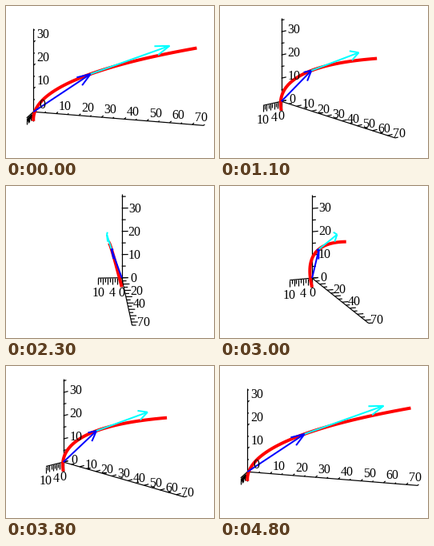
Write a matplotlib script that moves like this. It is 260 by 190 pixels and loops after 4.9 s.

```python
import numpy as np
import matplotlib.pyplot as plt
from matplotlib.animation import FuncAnimation
from matplotlib.collections import LineCollection

W, H, DPI = 260, 190, 100
FRAMES, HALF = 49, 24
FIRST, LAST = 16.7, 89.7                  # turn of the box in degrees
SCALE, SCALE_Z, TILT = 2.96, 2.9, 0.268   # pixels per unit, foreshortening
CENTER = np.array([37.5, 5, 16])          # pivot of the plotted box
PIVOT = np.array([136.4, 98.2])
PX = 72 / DPI

plt.rcParams["font.family"] = "Liberation Serif"
fig = plt.figure(figsize=(W / DPI, H / DPI), dpi=DPI, facecolor="white")
ax = fig.add_axes([0, 0, 1, 1])
ax.set(xlim=(0, W), ylim=(H, 0))
ax.axis("off")


def project(points, phi):
    x, y, z = (np.asarray(points, float) - CENTER).T
    c, s = np.cos(phi), np.sin(phi)
    u = SCALE * (x * c - y * s)
    v = SCALE * TILT * (x * s + y * c) - SCALE_Z * z
    return np.stack([u, v], axis=-1) + PIVOT


def on_axis(i, value):
    p = np.zeros(3)
    p[i] = value
    return p


def path(t):
    return np.stack([3 * t**2, 2 * t, 8 * t - 4], axis=-1)


def arrow(tail, d, head=6.7, half=2.0):
    """Shaft plus an open two-barbed head."""
    tip = tail + d
    side = np.cross(d, [0, 1, 0])
    side = half * side / np.linalg.norm(side)
    back = tip - head * d / np.linalg.norm(d)
    return [[tail, tip], [back + side, tip], [tip, back - side]]


def strokes(color, width):
    lines = LineCollection([], colors=color, linewidths=width * PX,
                           capstyle="butt", joinstyle="round")
    return ax.add_collection(lines)


def label(n):
    return ax.text(0, 0, str(n), size=16 * PX, ha="center",
                   va="baseline", color="black", zorder=5)


pos = path(np.array(3.0))
vel = np.array([36.0, 4, 16])
curve = path(np.linspace(0, 5, 90))
ends = [([0, 0, 0], [75, 0, 0]), ([0, 0, 0], [0, 10, 0]),
        ([0, 0, -4], [0, 0, 36])]
# axis index, last tick, minor step, major step
ticks = [(0, 75, 5, 10), (1, 10, 1, 2), (2, 35, 5, 10)]

axes_art = strokes("black", 1.2)
curve_art = strokes("red", 4)
arrows = [(strokes("blue", 2), arrow(np.zeros(3), pos)),
          (strokes("cyan", 2), arrow(pos, vel))]
x_text = {n: label(n) for n in range(10, 71, 10)}
y_text = {n: label(n) for n in (0, 4, 10)}
z_text = {n: label(n) for n in range(0, 31, 10)}


def place(text, point, offset, visible=True):
    x, y = point + offset
    text.set_position((x, y + 5.4))
    text.set_visible(bool(visible))


def draw(i):
    k = min(i, 2 * HALF - i)
    phi = np.radians(FIRST + (LAST - FIRST) * k / HALF)
    out = np.array([np.sin(phi), -TILT * np.cos(phi)])
    unit = out / np.linalg.norm(out)
    down = np.array([0, 1])

    segs = [project(e, phi) for e in ends]
    for axis, last, minor, major in ticks:
        for n in range(0, last + 1, minor):
            p = project(on_axis(axis, n), phi)
            size = 8 if n % major == 0 else 5
            segs.append([p, p + size * (down if axis == 1 else out)])
    axes_art.set_segments(segs)

    curve_art.set_segments([project(curve, phi)])
    for art, parts in arrows:
        art.set_segments([project(p, phi) for p in parts])

    # crowded labels are thinned out
    gap = 10 * SCALE * np.hypot(np.cos(phi), TILT * np.sin(phi))
    for n, t in x_text.items():
        place(t, project(on_axis(0, n), phi), 15 * unit,
              gap > 14 or n in (20, 40, 70))
    spread = SCALE * np.sin(phi)
    ends_fit = 10 * spread > 12.8
    y_shown = {0: ends_fit, 4: 4 * spread > 8.5, 10: ends_fit}
    for n, t in y_text.items():
        place(t, project(on_axis(1, n), phi), 17.5 * down, y_shown[n])
    for n, t in z_text.items():
        place(t, project(on_axis(2, n), phi), (16 if n else 14.5) * unit)
    return []


anim = FuncAnimation(fig, draw, frames=FRAMES, interval=100,
                     repeat=True, repeat_delay=0, blit=False)
plt.show()
```
